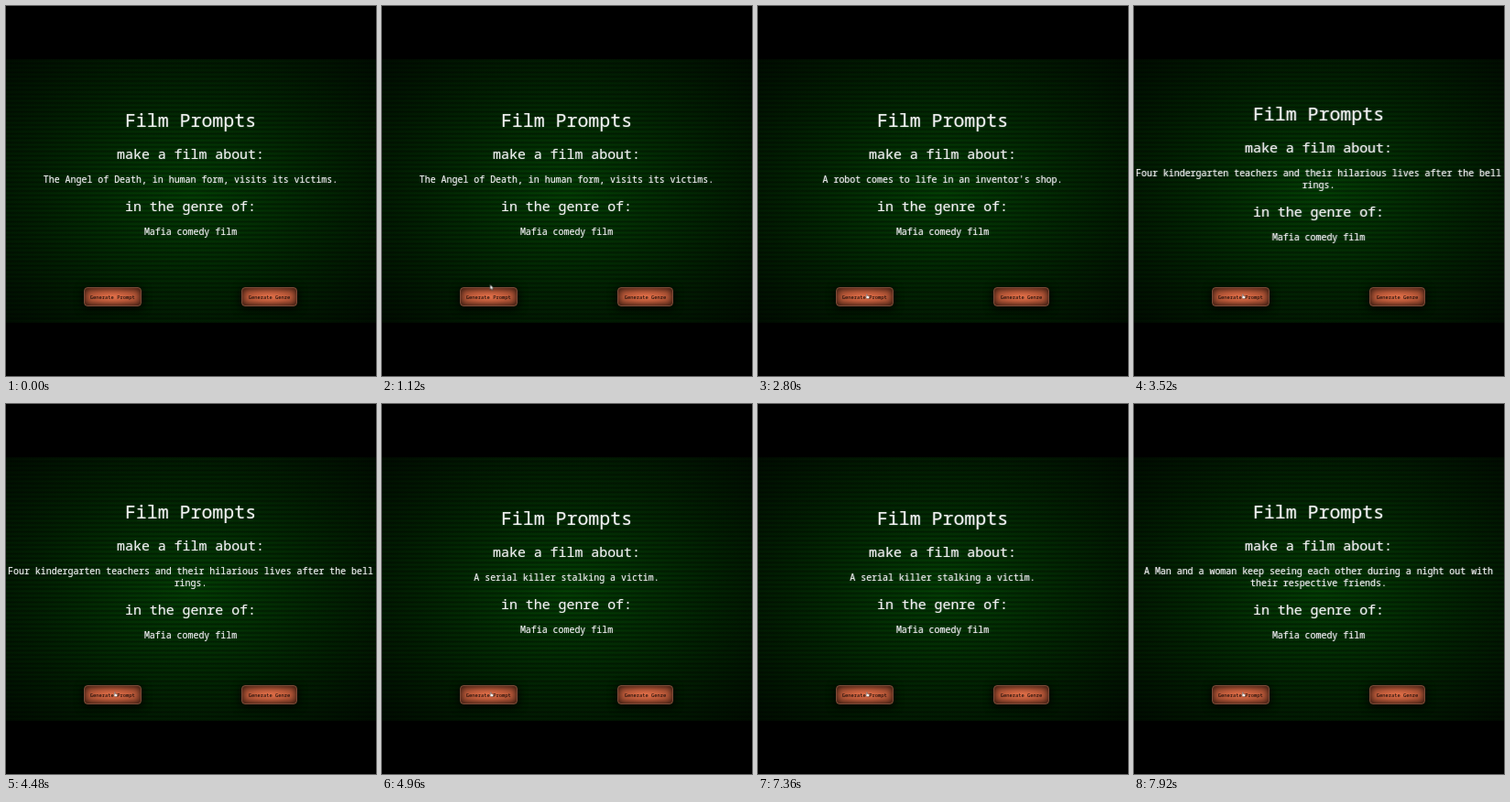
These frames come from a looping animation (404 by 404 pixels, 8000 ms). An HTML page:

```html
<!DOCTYPE html>
<html lang="en">
<head>
<meta charset="utf-8">
<title>Film Prompts</title>
<style>
  @property --x { syntax: "<length>"; inherits: true; initial-value: 0px; }

  html, body { margin: 0; width: 100%; height: 100%; overflow: hidden; background: #000; }
  body { position: relative; font-family: "Noto Sans Mono", "DejaVu Sans Mono", monospace; }

  .screen {
    position: absolute; left: 0; top: 58px; width: 404px; height: 288px;
    background:
      repeating-linear-gradient(rgba(0,0,0,.42) 0, transparent 2.4px, rgba(0,0,0,.42) 4.8px),
      radial-gradient(#034204, #000 125%);
  }

  .copy {
    position: absolute; left: -10px; top: 58px; width: 423px; height: 247px;
    display: flex; flex-direction: column; justify-content: center;
    color: #f0f2f0; text-align: center; white-space: pre;
    text-shadow:
      var(--x) 0 .6px rgba(120,140,165,.3),
      calc(-1 * var(--x)) 0 .6px rgba(165,120,130,.25),
      0 0 1.9px rgba(255,255,255,.3);
    animation: split 1.6s linear infinite;
  }
  h1, h2, p { margin: 0; font-weight: 400; }
  h1 { position: relative; top: .5px; font-size: 19.9px; line-height: 28px; }
  h2 { margin-top: 12.4px; font-size: 14.9px; line-height: 20px; font-weight: 500; }
  p { margin-top: 11.8px; font-size: 9.94px; line-height: 13px; }

  .button {
    position: absolute; top: 307px; height: 21px; box-sizing: border-box;
    border: .6px solid #7d4a38; border-radius: 4px;
    background: radial-gradient(#e5714a, #c05c3b 45%, #7c3b25 100%);
    box-shadow: inset 0 0 6px 1px rgba(0,0,0,.6), 0 2px 8px 2px rgba(0,0,0,.75);
    color: #000; font-size: 5.45px; line-height: 21px; text-align: center; white-space: nowrap;
  }
  .prompt { left: 84.5px; width: 63.5px; }
  .genre { left: 257px; width: 61px; }

  .pointer {
    position: absolute; left: 0; top: 0; width: 6px; height: 8px;
    animation: move 8s infinite;
  }
  .arrow { animation: arrow 8s step-end infinite; }
  .hand { animation: hand 8s step-end infinite; }

  @keyframes move {
    0% { transform: translate(124px, 285px); opacity: 0; animation-timing-function: step-end; }
    12% { transform: translate(124px, 285px); opacity: 1; animation-timing-function: ease-out; }
    14%, 17% { transform: translate(117.5px, 303.5px); opacity: 1; animation-timing-function: ease-out; }
    18%, 100% { transform: translate(117px, 314px); opacity: 1; }
  }
  @keyframes arrow { 0% { opacity: 1; } 17%, 100% { opacity: 0; } }
  @keyframes hand { 0% { opacity: 0; } 17%, 100% { opacity: 1; } }

  @keyframes split {
    0% { --x: .14px; }  5% { --x: .87px; }  10% { --x: .01px; }
    15% { --x: .13px; } 20% { --x: 1.08px; } 25% { --x: .5px; }
    30% { --x: .22px; } 35% { --x: 1.21px; } 40% { --x: 1.2px; }
    45% { --x: .69px; } 50% { --x: .03px; }  55% { --x: .74px; }
    60% { --x: .68px; } 65% { --x: .89px; }  70% { --x: .15px; }
    75% { --x: .59px; } 80% { --x: .03px; }  85% { --x: .03px; }
    90% { --x: 1.07px; } 95% { --x: .68px; } 100% { --x: .81px; }
  }
</style>
</head>
<body>
  <div class="screen"></div>
  <div class="copy">
    <h1>Film Prompts</h1>
    <h2>make a film about:</h2>
    <p id="prompt">The Angel of Death, in human form, visits its victims.</p>
    <h2>in the genre of:</h2>
    <p>Mafia comedy film</p>
  </div>
  <div class="button prompt">Generate Prompt</div>
  <div class="button genre">Generate Genre</div>
  <svg class="pointer" viewBox="0 0 6 8">
    <path class="arrow" d="M.5 .5V6.3L1.8 5.1L2.7 7L3.6 6.6L2.8 4.8H4.5Z" fill="#fff" stroke="#000" stroke-width=".4"/>
    <path class="hand" d="M1.4 .8Q2 .2 2.4 .9V2.5L4.3 3Q4.8 3.2 4.6 4L4 5.6H1.9L.4 3.6Q.6 3 1.4 3.5Z" fill="#fff" stroke="#000" stroke-width=".3"/>
  </svg>
<script>
  const LOOP = 8000;
  const prompts = [
    [0, "The Angel of Death, in human form, visits its victims."],
    [1680, "A robot comes to life in an inventor's shop."],
    [3360, "Four kindergarten teachers and their hilarious lives after the bell\nrings."],
    [4640, "A serial killer stalking a victim."],
    [7440, "A Man and a woman keep seeing each other during a night out with\ntheir respective friends."]
  ];
  const line = document.getElementById("prompt");
  let start;

  function draw(now) {
    start ??= now;
    const t = (now - start) % LOOP;
    const text = prompts.findLast(([from]) => from <= t)[1];
    if (line.textContent !== text) line.textContent = text;
    requestAnimationFrame(draw);
  }
  requestAnimationFrame(draw);
</script>
</body>
</html>
```
